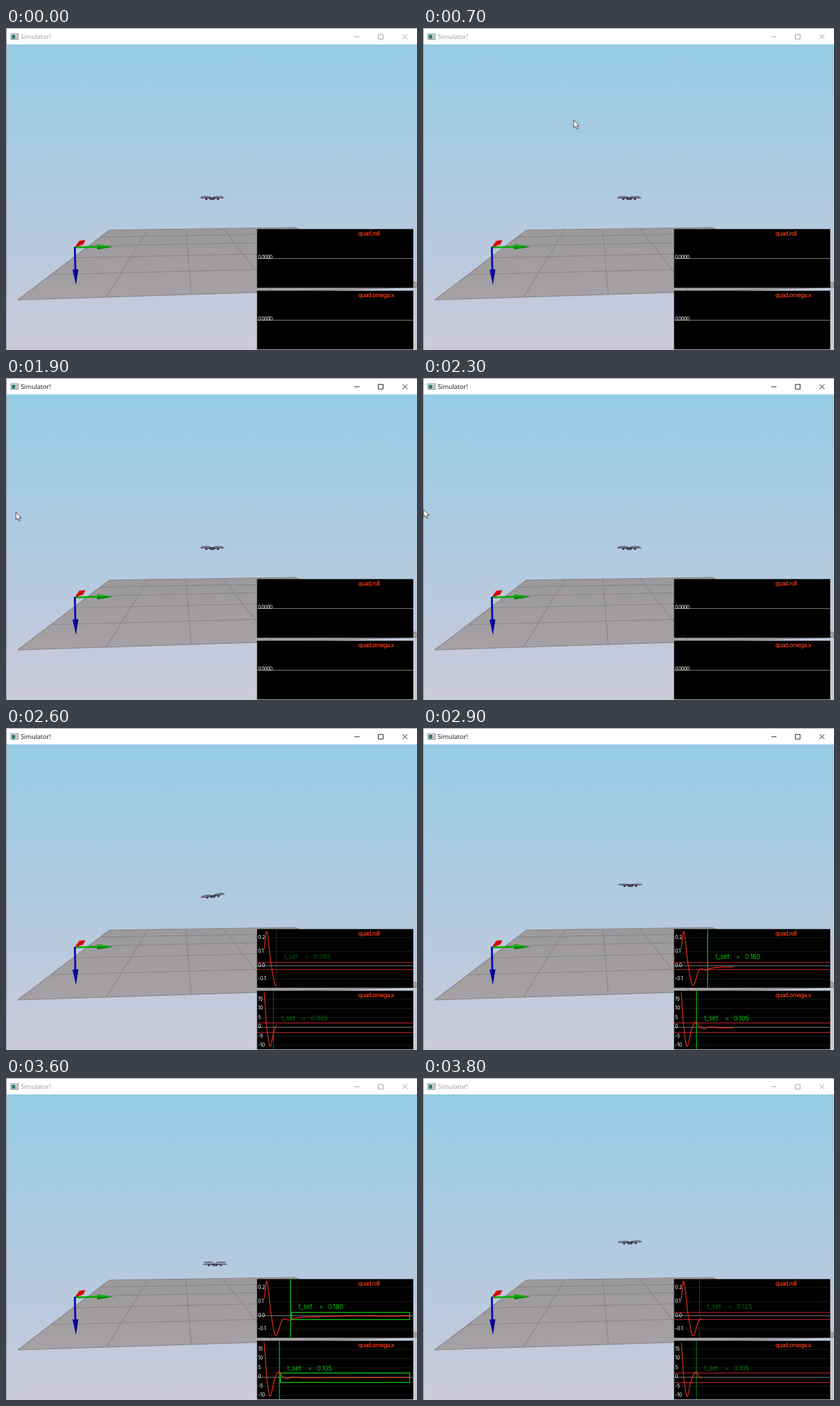
Recreate the animation shown at these times as an HTML page. Size 600x470 px, loop 3900 ms.

```html
<!DOCTYPE html>
<html lang="en">
<head>
<meta charset="utf-8">
<title>Simulator</title>
<style>
html, body { margin: 0; width: 100%; height: 100%; overflow: hidden; background: #fff; }
svg { display: block; width: 600px; height: 470px; }
text { font-family: Inter, "Open Sans", sans-serif; }
.caption { font: 9.2px "Open Sans", "Noto Sans", sans-serif; animation: focus 3.9s step-end infinite; fill: currentColor; }
.buttons { fill: none; stroke: currentColor; stroke-width: .9; animation: focus 3.9s step-end infinite; }
.name { font-size: 8.6px; font-weight: 500; letter-spacing: -.55px; fill: #ff3a12; }
.tick { font-size: 7px; letter-spacing: -.15px; fill: #fff; }
.zero { font-size: 7px; letter-spacing: -.5px; fill: #fff; }
.settle { font-size: 9.4px; font-weight: 300; fill: #0f0; }
.curve { fill: none; stroke: #f0341a; stroke-width: 1.1; }
.limit { stroke: #c8242c; stroke-width: 1; }
.band { fill: none; stroke: #00e810; stroke-width: 1.1; }
#cursor { animation: point 3.9s step-end infinite; }

@keyframes focus {
  0% { color: #999; }
  23.076% { color: #111; }
  87.179% { color: #999; }
}
@keyframes point {
  0% { transform: translate(-50px, 0); }
  2.564% { transform: translate(42px, 11px); }
  5.128% { transform: translate(80px, 60px); }
  7.692% { transform: translate(130px, 100px); }
  10.256% { transform: translate(180px, 125px); }
  12.82% { transform: translate(225px, 135px); }
  15.384% { transform: translate(239px, 124px); }
  17.948% { transform: translate(220px, 134.5px); }
  30.769% { transform: translate(-50px, 0); }
  48.717% { transform: translate(14.5px, 196px); }
  51.282% { transform: translate(90px, 205px); }
  53.846% { transform: translate(148px, 212px); }
  56.41% { transform: translate(100px, 206px); }
  58.974% { transform: translate(1px, 192px); }
  61.538% { transform: translate(-50px, 0); }
}
</style>
</head>
<body>
<svg viewBox="0 0 600 470">
  <defs>
    <linearGradient id="sky" x2="0" y2="1">
      <stop offset="0" stop-color="#95cbe4"/>
      <stop offset=".5" stop-color="#b0cae0"/>
      <stop offset="1" stop-color="#cccad9"/>
    </linearGradient>
    <linearGradient id="floor" x2="0" y2="1">
      <stop offset="0" stop-color="#9c999c"/>
      <stop offset="1" stop-color="#a5a1a4"/>
    </linearGradient>
  </defs>

  <rect width="600" height="24" fill="#fff"/>
  <rect y="24" width="600" height="446" fill="url(#sky)"/>

  <path d="M151 295 422 291 612 378 17 397z" fill="url(#floor)"/>
  <path id="grid" fill="none" stroke="#8a878a" stroke-width="1.2"/>

  <g id="axes">
    <path d="M101 319 107 310.5 116 309.5 113 316 105 319z" fill="#e01010"/>
    <path d="M103 318 113 311" stroke="#9c0808"/>
    <path d="M101 320.3 135 319.4" stroke="#0aa80a" stroke-width="2.6"/>
    <path d="M133 315.3 157 319.2 133 323.2z" fill="#12b012"/>
    <path d="M133 319.2H157L133 323.2z" fill="#078407"/>
    <path d="M100.5 319.5 101.2 354" stroke="#0808b0" stroke-width="2.8"/>
    <path d="M97 352.5H105.5L102 374.5z" fill="#0a0ab4"/>
    <path d="M101 352.5H105.5L102 374.5z" fill="#06067c"/>
  </g>

  <g id="drone">
    <g id="far" fill="#777587" stroke="#494858" stroke-width=".5">
      <ellipse cx="-9" rx="7" ry=".8"/><ellipse cx="9" rx="7" ry=".8"/>
    </g>
    <path d="M-14 .3-4-.6H4L14 .3 4 1.4H-4z" fill="#4c4a57"/>
    <g id="near" fill="#85809a" stroke="#504c60" stroke-width=".5">
      <ellipse cx="-11.5" rx="6.3" ry=".8"/><ellipse cx="11.5" rx="6.3" ry=".8"/>
    </g>
    <path d="M-10 .6H-7V2.8H-10zM7 .6H10V2.8H7z" fill="#2d2c3c"/>
    <path d="M-4-.8H4L3 3H-3z" fill="#32303c"/>
    <path d="M-2 1.6H2" stroke="#777398" stroke-width="1"/>
  </g>

  <g id="plots"></g>

  <path d="M0 .5H600" stroke="#a9a5bd"/>
  <path d="M.5 0V470" stroke="#8f93a8"/>

  <g>
    <rect x="7" y="8.5" width="11" height="8" fill="#e9eef0" stroke="#6b757c" stroke-width=".8"/>
    <rect x="8.5" y="10" width="5" height="5.5" fill="#28706c"/>
    <rect x="14.5" y="10" width="2.3" height="5.5" fill="#a9bcc2"/>
  </g>
  <text class="caption" x="21.5" y="16">Simulator!</text>
  <path class="buttons" d="M508.5 12.8H516M543.5 9.3H550.5V16.2H543.5zM579 9.2 586 16.2M586 9.2 579 16.2"/>

  <path id="cursor" d="M0 0V11L2.6 8.7 4.4 12.7 6.2 11.9 4.5 8H8z" fill="#fff" stroke="#222" stroke-width=".8"/>
</svg>

<script>
const LOOP = 3900, START = 2600, SWEEP = 219, LEFT = 376.3, PER_SEC = 218;
const $ = id => document.getElementById(id);

// Perspective floor, u to the right and v towards the viewer
const onFloor = (u, v) => {
  const w = 1 + .05 * u - .5605 * v;
  return ((292 * u - 143.5 * v + 151) / w).toFixed(1) + ' ' +
         ((10.6 * u - 120.5 * v + 295) / w).toFixed(1);
};
let grid = '';
for (let i = 0; i <= 5; i++) {
  const s = i / 5;
  grid += `M${onFloor(s, 0)}L${onFloor(s, 1)}M${onFloor(0, s)}L${onFloor(1, s)}`;
}
$('grid').setAttribute('d', grid);

// Monotone cubic through a few points
function spline(p) {
  const n = p.length - 1;
  const slope = i => (p[i + 1][1] - p[i][1]) / (p[i + 1][0] - p[i][0]);
  const m = p.map((_, i) => {
    if (i === 0) return slope(0);
    if (i === n) return slope(n - 1);
    const a = slope(i - 1), b = slope(i);
    return a * b <= 0 ? 0 : 2 * a * b / (a + b);
  });
  return x => {
    let i = 0;
    while (i < n - 1 && x > p[i + 1][0]) i++;
    const h = p[i + 1][0] - p[i][0], s = (x - p[i][0]) / h, r = 1 - s;
    return r * r * ((1 + 2 * s) * p[i][1] + s * h * m[i]) +
           s * s * ((3 - 2 * s) * p[i + 1][1] - r * h * m[i + 1]);
  };
}

// "inside" lists the spans of time spent within the limits
const plots = [
  { name: 'quad.roll', top: 293.5, zero: 347, limits: [342.2, 352.6],
    ticks: [['0.2', 306], ['0.1', 326.3], ['0.0', 346.7], ['-0.1', 366.5]],
    inside: [[.045, .055], [.125, .15], [.18, 9]],
    y: spline([[377, 323], [380.5, 297], [387, 345], [394, 376], [404, 352.5], [407, 351.8],
      [413, 353.5], [418, 351.3], [430, 349.4], [453, 348.5], [520, 347.2], [545, 347.8], [596, 347.3]]) },
  { name: 'quad.omega.x', top: 383.5, zero: 437, limits: [430.6, 444.4],
    ticks: [['15', 396], ['10', 409.5], ['5', 423], ['0', 436.3], ['-5', 449.7], ['-10', 463]],
    inside: [[.065, .09], [.105, 9]],
    y: spline([[377, 386], [381, 440], [385.5, 464.5], [392, 440], [398.2, 429.3], [404, 436],
      [410, 439], [419, 436.3], [432, 437.6], [596, 437.2]]) }
];

const line = (y, attrs) => `<path d="M367 ${y}H594.5" ${attrs}/>`;

plots.forEach(p => {
  const g = document.createElementNS('http://www.w3.org/2000/svg', 'g');
  g.innerHTML = `<rect x="366.5" y="${p.top}" width="228" height="85.7"/>
    <g class="idle">${line(p.top + 43, 'stroke="#777"')}
      <text class="zero" x="368" y="${p.top + 43}">0.0000</text></g>
    <g class="live">
      ${p.ticks.map(k => line(k[1], 'stroke="#1a1a1a"')).join('')}
      ${line(p.zero, 'stroke="#777"')}
      <g class="limits">${p.limits.map(y => line(y, 'class="limit"')).join('')}</g>
      <path class="mark" stroke-width="1.1"/>
      <rect class="band" y="${p.limits[0]}" height="${p.limits[1] - p.limits[0]}"/>
      <path class="curve"/>
      ${p.ticks.map(k => `<text class="tick" x="368" y="${k[1] + 1.8}">${k[0]}</text>`).join('')}
      <g class="settle"><text>t_set</text><text x="30">=</text><text class="value" x="43"></text></g>
    </g>
    <text class="name" x="514.3" y="${p.top + 9}">${p.name}</text>`;
  $('plots').append(g);
  p.part = name => g.querySelector('.' + name);
});

function drawPlot(p, x) {
  const live = x !== null;
  p.part('idle').style.display = live ? 'none' : '';
  p.part('live').style.display = live ? '' : 'none';
  if (!live) return;

  const t = (x - LEFT) / PER_SEC;
  const span = p.inside.find(s => t >= s[0] && t < s[1]);
  const set = span ? span[0] : Math.round(t * 200) / 200;
  const held = Math.max(0, t - set), done = held >= .75;
  const glow = Math.min(1, .45 + held * 4);
  const markX = LEFT + PER_SEC * set;

  let d = '';
  for (let q = 377; q < x; q += .5) d += `${d ? 'L' : 'M'}${q} ${p.y(q).toFixed(2)}`;
  p.part('curve').setAttribute('d', d + `L${x} ${p.y(x).toFixed(2)}`);

  const mark = p.part('mark');
  mark.setAttribute('d', `M${markX} ${p.top}v85.7`);
  mark.setAttribute('stroke', held < .02 ? '#505850' : '#00d010');
  mark.setAttribute('opacity', glow);

  const label = p.part('settle');
  label.setAttribute('transform', `translate(${markX + 11.5} ${p.top + 43.3})`);
  label.setAttribute('opacity', glow);
  p.part('value').textContent = set.toFixed(3);

  p.part('limits').setAttribute('opacity', done ? .25 : 1);
  const band = p.part('band');
  band.style.display = done ? '' : 'none';
  band.setAttribute('x', markX + 1.3);
  band.setAttribute('width', Math.max(0, x - markX));
}

function drawDrone(x) {
  let px = 301, py = 248, angle = 0;
  if (x !== null) {
    const t = (x - LEFT) / PER_SEC;
    px = 301.5 + 3.5 * t;
    py = 240 - 51.9 * (t - .14) + 145.3 * (t - .14) * (t - .352);
    angle = (plots[0].zero - plots[0].y(x)) / 202 * 180 / Math.PI;
  }
  const depth = Math.max(0, py - 226) * .045;
  $('drone').setAttribute('transform', `translate(${px} ${py}) rotate(${angle})`);
  $('far').setAttribute('transform', `translate(0 ${-.5 - depth})`);
  $('near').setAttribute('transform', `translate(0 ${-.5 + depth * .4})`);
}

let first = null;
function frame(now) {
  if (first === null) first = now;
  // The simulation redraws ten times a second
  const ms = Math.floor(((now - first) % LOOP + 1) / 100) * 100 % LOOP;
  const x = ms < START ? null : 377 + (ms - 2507) * .193 % SWEEP;
  plots.forEach(p => drawPlot(p, x));
  drawDrone(x);
  requestAnimationFrame(frame);
}
requestAnimationFrame(frame);
</script>
</body>
</html>
```
